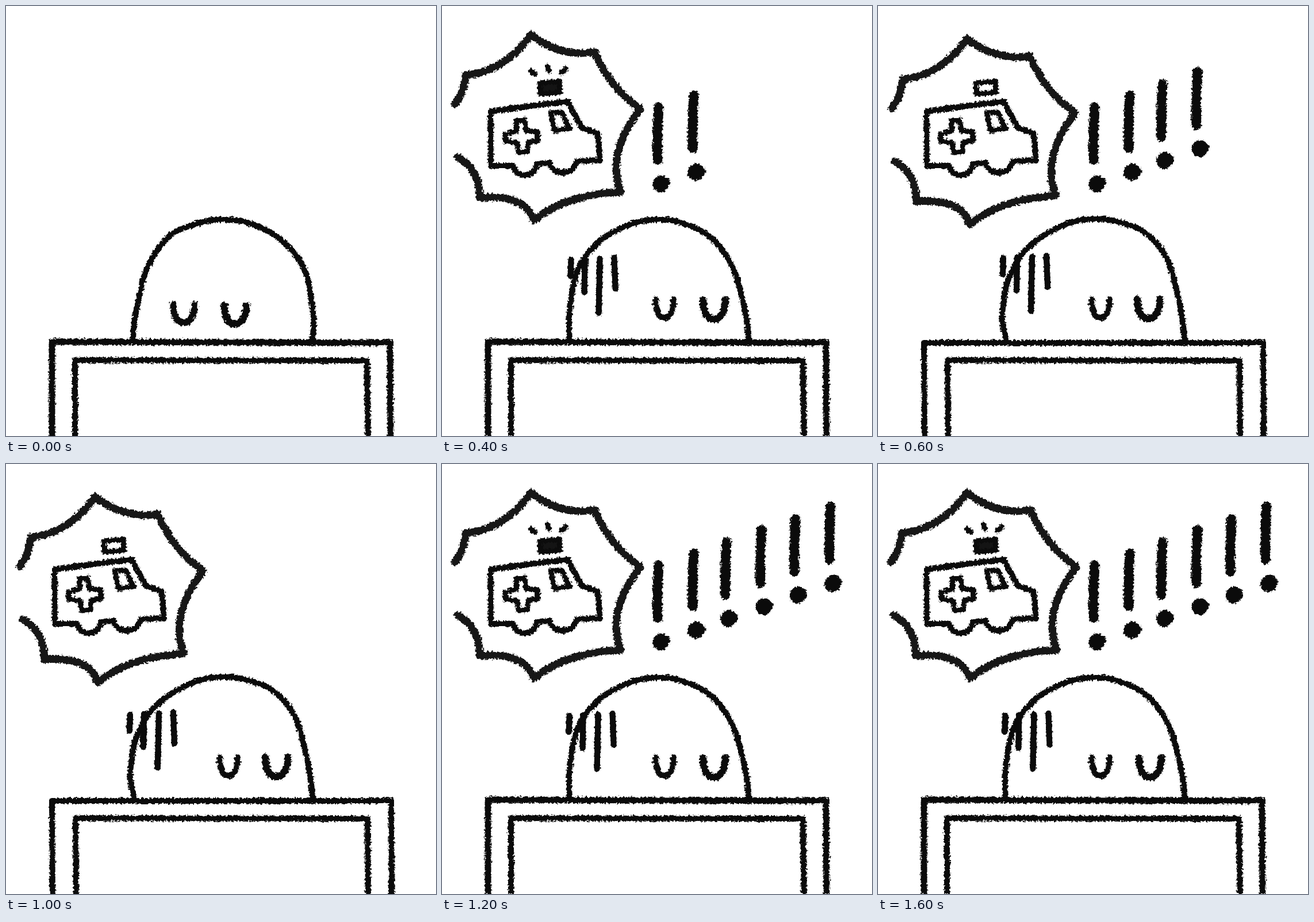
Write an HTML page that moves like this. It is 748x748 px and loops after 1800 ms.

```html
<!DOCTYPE html>
<html lang="en">
<head>
<meta charset="utf-8">
<title>Ambulance alarm</title>
<style>
html, body { margin: 0; width: 100%; height: 100%; overflow: hidden; background: #fff; }
svg { display: block; width: 748px; height: 748px; }
path { fill: none; stroke: #0b0b0b; stroke-width: 10; stroke-linecap: round; stroke-linejoin: round; }
.burst { stroke: #171717; stroke-width: 13; }
.halo path { stroke: #fff; stroke-width: 18; }
.thin path { stroke-width: 9; }
#marks path { stroke-width: 17; }
.dot { fill: #0b0b0b; stroke: none; }
</style>
</head>
<body>
<svg viewBox="0 0 748 748">
  <defs>
    <filter id="chalk" filterUnits="userSpaceOnUse" x="0" y="0" width="748" height="748" color-interpolation-filters="sRGB">
      <feTurbulence type="fractalNoise" baseFrequency=".28" numOctaves="2" seed="4" result="grain"/>
      <feDisplacementMap in="SourceGraphic" in2="grain" scale="8" xChannelSelector="R" yChannelSelector="G"/>
      <feGaussianBlur stdDeviation=".55"/>
    </filter>
    <g id="strokes">
      <path d="M215 435L214 463"/>
      <path d="M239 434L238 491"/>
      <path d="M265 433L263 527"/>
      <path d="M290 431L292 485"/>
    </g>
  </defs>

  <path id="head" filter="url(#chalk)"/>
  <g id="gloom">
    <g class="halo"><use href="#strokes"/></g>
  </g>

  <g filter="url(#chalk)">
    <g id="gloomInk" class="thin"><use href="#strokes"/></g>
    <path id="eyeL"/>
    <path id="eyeR"/>
    <path id="outer"/>
    <path id="inner"/>
    <g id="bubble">
      <path id="burst" class="burst" d="M24 178Q40 158 43 127Q108 122 155 57Q207 97 264 87Q291 150 343 186Q284 262 309 330Q212 336 160 380Q145 334 67 340Q66 290 29 270"/>
      <path d="M85 278L84 183L219 166L243 212L271 222L275 268L234 270C230 285 220 290 210 290C199 290 190 283 187 273L166 274C162 288 154 294 145 294C134 294 126 288 124 278Z"/>
      <g class="thin">
        <path id="cross" d="M128 199L142 198L145 217L165 219L165 234L149 237L147 254L132 255L129 238L109 235L109 223L128 218Z"/>
        <path d="M189 185L208 185L222 213L196 217Z"/>
        <path id="siren" d="M170 134L204 131L205 150L171 153Z"/>
        <path id="rays" d="M155 113L162 119M184 106L186 113M215 109L208 116"/>
      </g>
    </g>
    <g id="marks"></g>
  </g>
</svg>
<script>
const STEP = 200, STEPS = 9;
const $ = id => document.getElementById(id);
const show = (el, on) => el.setAttribute('display', on ? 'inline' : 'none');
const shift = (el, x, y) => el.setAttribute('transform', `translate(${x} ${y})`);
const setPath = (id, d) => $(id).setAttribute('d', d);

// Smooth curve through a flat list of x, y pairs
function smooth(flat) {
  const p = [];
  for (let i = 0; i < flat.length; i += 2) p.push([flat[i], flat[i + 1]]);
  const at = i => p[Math.max(0, Math.min(p.length - 1, i))];
  const ctrl = (a, b, c) => [0, 1].map(k => a[k] + (b[k] - c[k]) / 6);
  let d = 'M' + p[0];
  for (let i = 0; i < p.length - 1; i++) {
    d += `C${ctrl(at(i), at(i + 1), at(i - 1))} ${ctrl(at(i + 1), at(i), at(i + 2))} ${at(i + 1)}`;
  }
  return d;
}

const heads = {
  rest: smooth([221, 580, 224, 545, 239, 475, 255, 437, 275, 410, 300, 390, 360, 372, 400, 373, 430, 380, 470, 400, 500, 428, 515, 450, 526, 480, 535, 545, 533, 580]),
  even: smooth([222, 580, 221, 545, 226, 500, 236, 460, 250, 435, 278, 406, 310, 387, 345, 375, 375, 371, 400, 373, 440, 386, 470, 405, 495, 435, 510, 465, 520, 500, 530, 545, 534, 580]),
  odd: smooth([223, 580, 216, 545, 220, 505, 227, 475, 250, 432, 280, 405, 310, 387, 345, 374, 385, 370, 420, 376, 455, 388, 485, 413, 505, 445, 517, 485, 527, 530, 534, 580])
};

// Closed eye: a U from its top left corner
const eye = (x, y, w, h) =>
  `M${x} ${y}C${x} ${y + h * .68} ${x + w * .2} ${y + h} ${x + w * .48} ${y + h}S${x + w} ${y + h * .65} ${x + w} ${y}`;

const marks = [0, 61, 118, 179, 238, 299].map((dx, i) => {
  const g = document.createElementNS('http://www.w3.org/2000/svg', 'g');
  g.innerHTML = '<path d="M377 176Q374 220 375 268"/><path class="dot" d="M366 309Q368 297 382 294Q397 298 397 309Q393 322 381 324Q367 323 366 309"/>';
  shift(g, dx, -20.3 * i);
  $('marks').append(g);
  return g;
});

function drawEyes(step, even) {
  const L = $('eyeL'), R = $('eyeR');
  if (step < 2) {
    const dx = step * 60, dy = -step;
    setPath('eyeL', eye(291 + dx, 519 + dy, 37, 32));
    setPath('eyeR', eye(380 + dx, 521 + dy, 38, 32));
  } else {
    setPath('eyeL', eye(372, 510, 31, 33));
    setPath('eyeR', even ? eye(454, 511, 39, 34) : eye(451, 510, 39, 34));
  }
  L.style.strokeWidth = step < 2 ? 11.5 : 10;
  R.style.strokeWidth = step === 1 ? 11.5 : 12.5;
}

function drawGloom(step, even) {
  const on = step > 1;
  show($('gloom'), on);
  show($('gloomInk'), on);
  const drift = 3.6 * Math.pow(.55, step - 3);
  const x = even ? 6.3 + drift * .5 : drift * .85;
  const y = even ? 2.7 + drift * .6 : drift;
  shift($('gloom'), x, y);
  shift($('gloomInk'), x, y);
}

function drawTable(even) {
  setPath('outer', even ? 'M80 760L80 584L668 586L669 760' : 'M81 760L80 586L670 586L671 760');
  setPath('inner', even ? 'M120 760L120 616L628 617L630 760' : 'M122 760L121 616L629 617L630 760');
  $('outer').style.strokeWidth = even ? 11 : 10;
}

function drawBubble(step, even) {
  show($('bubble'), step > 0);
  $('burst').setAttribute('transform', even ? 'translate(-2 -7) scale(1.012 1)' : '');
  shift($('cross'), even ? 1.5 : 0, 0);
  $('siren').style.fill = even ? '#141414' : 'none';
  show($('rays'), even);
}

// Marks grow in pairs, then all six blink
function markCount(step, even) {
  if (step < 2) return 0;
  if (step < 5) return (step - 1) * 2;
  return even ? 6 : 0;
}

function draw(step) {
  const even = step % 2 === 0;
  setPath('head', step === 0 ? heads.rest : even || step === 1 ? heads.even : heads.odd);
  drawEyes(step, even);
  drawGloom(step, even);
  drawTable(even);
  drawBubble(step, even);
  const count = markCount(step, even);
  marks.forEach((m, i) => show(m, i < count));
}

let last = -1;
const start = performance.now();
function tick(now) {
  const step = Math.floor(Math.max(0, now - start) / STEP) % STEPS;
  if (step !== last) draw(last = step);
  requestAnimationFrame(tick);
}
draw(last = 0);
requestAnimationFrame(tick);
</script>
</body>
</html>
```
